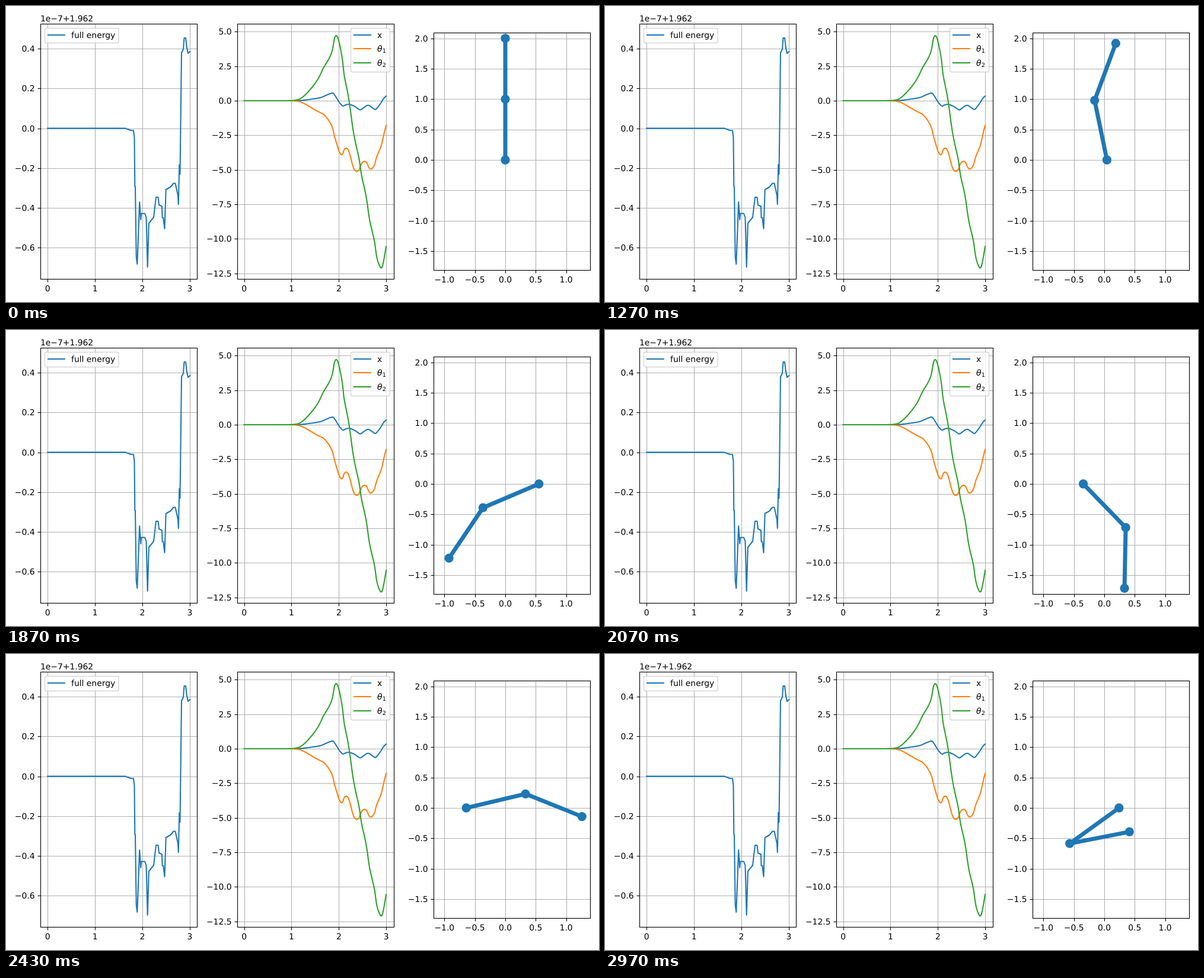
Animation of 1000x500 px, one loop 3010 ms. Source, as an HTML page:

```html
<!DOCTYPE html>
<html lang="en">
<head>
<meta charset="utf-8">
<title>Double pendulum on a cart</title>
<style>
  html, body { margin: 0; width: 100%; height: 100%; overflow: hidden; background: #fff; }
  svg { display: block; width: 1000px; height: 500px; }
  text { font: 13.89px "DejaVu Sans", sans-serif; text-rendering: geometricPrecision; }
  .end { text-anchor: end; }
  .mid { text-anchor: middle; }
  .grid { stroke: #b0b0b0; stroke-width: 1.11; }
  .axis { stroke: #000; stroke-width: 1.11; fill: none; }
  .curve { fill: none; stroke-width: 2.08; stroke-linejoin: round; stroke-linecap: square; }
  .legend { fill: #fff; fill-opacity: .8; stroke: #ccc; stroke-opacity: .8; stroke-width: 1.39; }
  .theta { font-style: oblique; }
  .sub { font-size: 9.72px; }
  #rods { fill: none; stroke: #1f77b4; stroke-width: 6.94; stroke-linejoin: round; }
  #joints { fill: #1f77b4; }
</style>
</head>
<body>
<svg id="stage" viewBox="0 0 1000 500"></svg>
<script>
const BLUE = '#1f77b4', ORANGE = '#ff7f0e', GREEN = '#2ca02c';
const LOOP = 3010, FPS = 30, LAST = 89;
const { sin, cos, sqrt } = Math;

// Cart and two unit rods of equal mass, each rod's mass at its middle.
// The cart is eliminated: the centre of mass never moves sideways.
const G = 9.81, STEP = .0002, END = 3.01;
const cart = (a, b) => -(3 * sin(a) + sin(b)) / 6;

function rates([a, b, u, v]) {
  const ca = cos(a), cb = cos(b), sd = sin(a - b), cd = cos(a - b);
  const f = 1.5 * sin(a) * u * u + .5 * sin(b) * v * v;
  const m11 = 1.25 - .75 * ca * ca, m12 = .5 * cd - .25 * ca * cb, m22 = .25 - cb * cb / 12;
  const r1 = 1.5 * G * sin(a) - .5 * sd * v * v - .5 * ca * f;
  const r2 = .5 * G * sin(b) + .5 * sd * u * u - cb * f / 6;
  const det = m11 * m22 - m12 * m12;
  return [u, v, (m22 * r1 - m12 * r2) / det, (m11 * r2 - m12 * r1) / det];
}

function advance(s) {
  const add = (k, h) => s.map((v, i) => v + h * k[i]);
  const k1 = rates(s), k2 = rates(add(k1, STEP / 2));
  const k3 = rates(add(k2, STEP / 2)), k4 = rates(add(k3, STEP));
  return add(k1.map((k, i) => (k + 2 * k2[i] + 2 * k3[i] + k4[i]) / 6), STEP);
}

// Fall from upright along the fastest unstable mode; one known angle sets the clock.
function simulate(keyTime, keyAngle) {
  const tilt = 1e-7, rate = sqrt(G * (12 + sqrt(108)));
  const path = [[-1, sqrt(3), -rate, rate * sqrt(3)].map(v => v * tilt)];
  const last = () => path[path.length - 1];
  while (last()[1] > keyAngle && path.length < 20000) path.push(advance(last()));
  const start = keyTime - (path.length - 1) * STEP;
  while (start + path.length * STEP < END) path.push(advance(last()));
  return t => path[Math.min(path.length - 1, Math.max(0, Math.round((t - start) / STEP)))];
}
const state = simulate(73 / FPS, -4.326);

const energy = `M70.2 206.6H201L211 210.3H215L216.5 222 217.3 305H218L219.7 424 221.3 436
  222.5 405 225.2 331 227.3 361 228.3 350.5H234L236.5 357 238.7 441 240.9 367 249 357
  253 323H256.5L258 336 263 338.5 263.6 357.5H265.2L267.5 376 269.7 310 277 306
  282.5 299.5H285.5L290 320 290.8 335 292.3 268 293.5 284 296 79 299 73 300.5 54H303
  L304.9 70 307 80 310.5 77`;

const snap = v => Math.round(v) + .5;
const line = (x1, y1, x2, y2, attrs) =>
  `<line x1="${x1}" y1="${y1}" x2="${x2}" y2="${y2}" ${attrs}/>`;
const text = (x, y, s, cls = '') => `<text x="${x}" y="${y}" class="${cls}">${s}</text>`;
const label = (v, digits) => v.toFixed(digits).replace('-', '\u2212');
const range = (from, step, count) => Array.from({ length: count }, (_, i) => from + i * step);

function plot(p, content) {
  let grid = '', ticks = '';
  for (const v of p.xs) {
    const x = p.x(v), sx = snap(x);
    grid += line(sx, p.top, sx, p.bottom, 'class="grid"');
    ticks += line(sx, p.bottom, sx, p.bottom + 5, 'class="axis"')
      + text(x, p.bottom + 20.5, label(v, p.xDigits), 'mid');
  }
  for (const v of p.ys) {
    const y = p.y(v), sy = snap(y);
    grid += line(p.left, sy, p.right, sy, 'class="grid"');
    ticks += line(p.left - 5, sy, p.left, sy, 'class="axis"')
      + text(p.left - 10, Math.round(y + 5), label(v, 1), 'end');
  }
  return grid + content + ticks + `<rect x="${p.left}" y="${p.top}" width="${p.right - p.left}"
    height="${p.bottom - p.top}" class="axis"/>`;
}

const curve = (d, color) => `<path d="${d}" class="curve" stroke="${color}"/>`;
const graph = (f, p, color) => curve('M' + range(0, .01, 301)
  .map(t => `${p.x(t).toFixed(2)} ${p.y(f(...state(t))).toFixed(2)}`).join('L'), color);
const legend = (x, w, h) =>
  `<rect x="${x}" y="37.5" width="${w}" height="${h}" rx="2.8" class="legend"/>`;
const key = (x, y, color) => line(x, y, x + 27.8, y, `class="curve" stroke="${color}"`);
const theta = (y, n) => text(626, y, '\u03b8', 'theta') + text(634.7, y + 2.3, n, 'sub');

const left = {
  left: 58.5, right: 322.5, top: 30.5, bottom: 461.5, xDigits: 0,
  x: v => 70.2 + 79.87 * v, y: v => 206.65 - 335.8 * v,
  xs: range(0, 1, 4), ys: range(-3, 1, 6).map(i => i / 5)
};
const middle = {
  left: 390.5, right: 654.5, top: 30.5, bottom: 461.5, xDigits: 0,
  x: v => 401.57 + 79.87 * v, y: v => 160 - 23.33 * v,
  xs: range(0, 1, 4), ys: range(-12.5, 2.5, 8)
};
const right = {
  left: 721.5, right: 985.5, top: 45.5, bottom: 446.5, xDigits: 1,
  x: v => 842 + 102.65 * v, y: v => 260 - 102.65 * v,
  xs: range(-1, .5, 5), ys: range(-1.5, .5, 8)
};

document.getElementById('stage').innerHTML =
  '<clipPath id="view"><rect x="721.5" y="45.5" width="264" height="401"/></clipPath>'
  + plot(left, curve(energy, BLUE))
  + text(58, 26, '1e\u22127+1.962')
  + legend(65.5, 124.5, 25) + key(71, 49, BLUE) + text(110, 54, 'full energy')
  + plot(middle, graph(cart, middle, BLUE) + graph(a => a, middle, ORANGE)
    + graph((a, b) => b, middle, GREEN))
  + legend(581.5, 66, 74)
  + key(587, 49, BLUE) + key(587, 72, ORANGE) + key(587, 96, GREEN)
  + text(626, 54, 'x') + theta(77, 1) + theta(101, 2)
  + plot(right, '<g clip-path="url(#view)"><polyline id="rods"/><g id="joints">'
    + '<circle r="7.64"/>'.repeat(3) + '</g></g>');

const rods = document.getElementById('rods');
const joints = document.querySelectorAll('#joints circle');

function pose(t) {
  const [a, b] = state(t), x = cart(a, b);
  const mx = x + sin(a), my = cos(a);
  const points = [[x, 0], [mx, my], [mx + sin(b), my + cos(b)]]
    .map(([u, v]) => [right.x(u), right.y(v)]);
  rods.setAttribute('points', points.join(' '));
  points.forEach(([cx, cy], i) => {
    joints[i].setAttribute('cx', cx);
    joints[i].setAttribute('cy', cy);
  });
}

// 30 poses a second, each starting on a whole hundredth
function tick() {
  const hundredths = Math.floor(performance.now() % LOOP / 10);
  pose(Math.min(LAST, Math.floor((hundredths + .5) * FPS / 100)) / FPS);
  requestAnimationFrame(tick);
}
tick();
</script>
</body>
</html>
```
